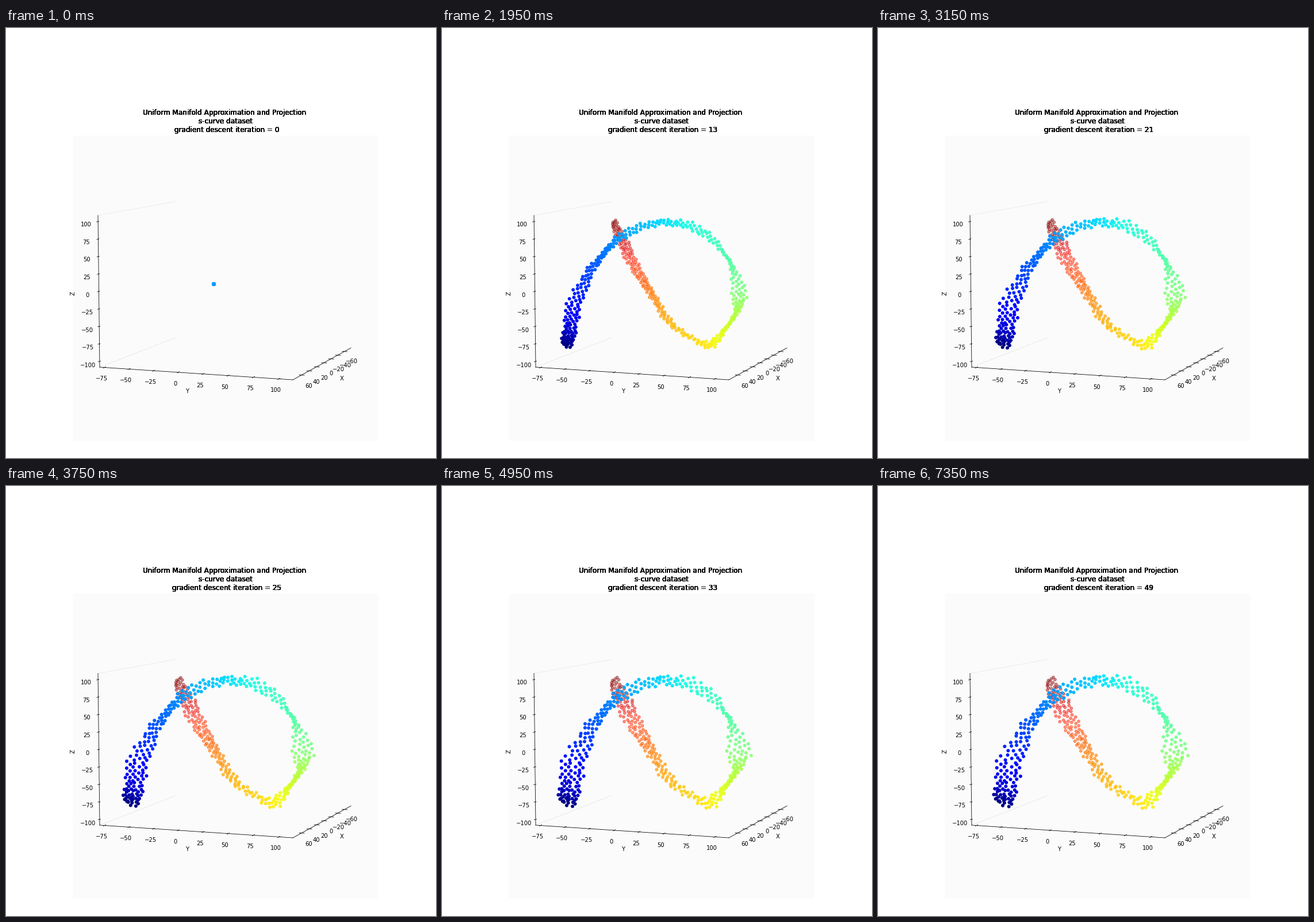
Recreate the animation shown at these times as a matplotlib script. Size 748 by 748 pixels, loop 7.5 s.

```python
import matplotlib.pyplot as plt
import numpy as np
from matplotlib.animation import FuncAnimation
from matplotlib.patches import Rectangle

SIZE, DPI = 748, 72
FRAMES, INTERVAL = 50, 150
COUNT = 500
ORIGIN = np.array([361.0, 445.0])

plt.rcParams["font.family"] = "DejaVu Sans"
fig = plt.figure(figsize=(SIZE / DPI, SIZE / DPI), dpi=DPI, facecolor="white")
ax = fig.add_axes([0, 0, 1, 1])
ax.set_xlim(0, SIZE)
ax.set_ylim(SIZE, 0)
ax.axis("off")


def line(x0, y0, x1, y1, color="black"):
    ax.plot([x0, x1], [y0, y1], color=color, lw=0.8, zorder=1)


def label(x, y, text, **kw):
    ax.text(x, y + 1, text, fontsize=10, ha="center", va="center", **kw)


def number(v):
    return str(v).replace("-", "\u2212")


def draw_axes():
    ax.add_patch(Rectangle((116, 187), 532, 531, fc="#fbfbfb", ec="none", zorder=0))
    line(160, 326, 294, 302, "#e9e9e9")
    line(163, 590, 294, 539, "#e4e4e4")
    line(160, 326, 163, 590)
    line(163, 590, 499, 612)
    line(499, 612, 600, 556.5)

    for k, v in enumerate(range(-100, 101, 25)):
        y = 580 - 30.4 * k
        x = 160 + (y - 326) / 88
        line(x - 2.5, y + 0.5, x + 1.5, y - 0.5)
        label(142.6 - 0.38 * k, 586 - 30.6 * k, number(v))

    for k, v in enumerate(range(-75, 101, 25)):
        x = 171 + 42.2 * k + 0.16 * k * k
        y = 590 + (x - 163) * 22 / 336
        line(x - 1.5, y + 1, x + 2.5, y - 1)
        label(x - 5, 609 + 2.9 * k, number(v))

    for k, v in enumerate(range(60, -61, -20)):
        x = 514 + 13.4 * k - 0.16 * k * k
        y = 612 - (x - 499) * 0.55
        line(x - 4, y - 0.3, x + 5, y + 0.3)
        label(x + 13, 622 - 7.2 * k, number(v))

    label(584, 609, "X")
    label(315.5, 631, "Y")
    label(116.5, 460.5, "Z", rotation=90)


# Ribbon edges: t, outer x, outer y, inner x, inner y
RIBBON = np.array([
    (0.00, 200, 547, 231, 561),
    (0.07, 203, 519, 242, 532),
    (0.13, 206, 483, 253, 488),
    (0.19, 240, 425, 264, 441),
    (0.25, 285, 378, 293, 390),
    (0.28, 303, 353, 318, 374),
    (0.34, 382, 329, 385, 347),
    (0.40, 462, 345, 446, 366),
    (0.45, 503, 405, 496, 405),
    (0.50, 541, 456, 492, 456),
    (0.56, 520, 492, 504, 496),
    (0.61, 499, 520, 490, 522),
    (0.66, 472, 562, 455, 540),
    (0.71, 398, 523, 414, 518),
    (0.78, 357, 469, 375, 460),
    (0.86, 319, 418, 351, 412),
    (0.94, 298, 370, 328, 366),
    (1.00, 291, 341, 305, 331),
])


def smooth(t, knots, values):
    """Cubic Hermite curve through the given knots."""
    slope = np.gradient(values, knots, axis=0)
    i = np.clip(np.searchsorted(knots, t) - 1, 0, len(knots) - 2)
    h = (knots[i + 1] - knots[i])[:, None]
    u = (t - knots[i])[:, None] / h
    a, b = values[i], values[i + 1]
    ease = u * u * (3 - 2 * u)
    bend = u * (1 - u) * ((1 - u) * slope[i] - u * slope[i + 1])
    return a + (b - a) * ease + h * bend


# Far end of the ribbon comes first so that nearer points cover it
rng = np.random.default_rng(4)
order = np.arange(COUNT)
t = 1 - (order + 0.5) / COUNT
across = 2 * (order * 0.6180339887 % 1) - 1
across = np.clip(across + rng.uniform(-0.1, 0.1, COUNT), -1, 1)
edges = smooth(t, RIBBON[:, 0], RIBBON[:, 1:])
outer, inner = edges[:, :2], edges[:, 2:]
middle = (outer + inner) / 2
spread = (outer - inner) / 2 * across[:, None]
spread += rng.uniform(-1.5, 1.5, (COUNT, 2))

jet = plt.get_cmap("jet")
colors = jet(t)
colors[:, 3] = np.interp(t, [0.25, 0.5, 0.65, 0.85, 1], [1, 0.77, 0.8, 0.45, 0.4])


def positions(n):
    grow = 1 - 0.2 ** n
    width = 1 - 0.87 * (1 - n / FRAMES) ** 2.5
    return ORIGIN + grow * (middle + width * spread - ORIGIN)


draw_axes()
dots = ax.scatter(middle[:, 0], middle[:, 1], s=20, lw=1.5, zorder=3)
# Stacked copies give the title its heavy edges
titles = [ax.text(381.8, 181, "", fontsize=12, ha="center", va="baseline")
          for _ in range(10)]


def update(n):
    dots.set_offsets(positions(n))
    shade = colors if n else [jet(0.28)]
    dots.set_facecolor(shade)
    dots.set_edgecolor(shade)
    text = ("Uniform Manifold Approximation and Projection \n"
            " s-curve dataset \n"
            f" gradient descent iteration = {n}")
    for title in titles:
        title.set_text(text)
    return [dots, *titles]


anim = FuncAnimation(fig, update, frames=FRAMES, interval=INTERVAL,
                     repeat=True, repeat_delay=0, blit=False)
plt.show()
```
